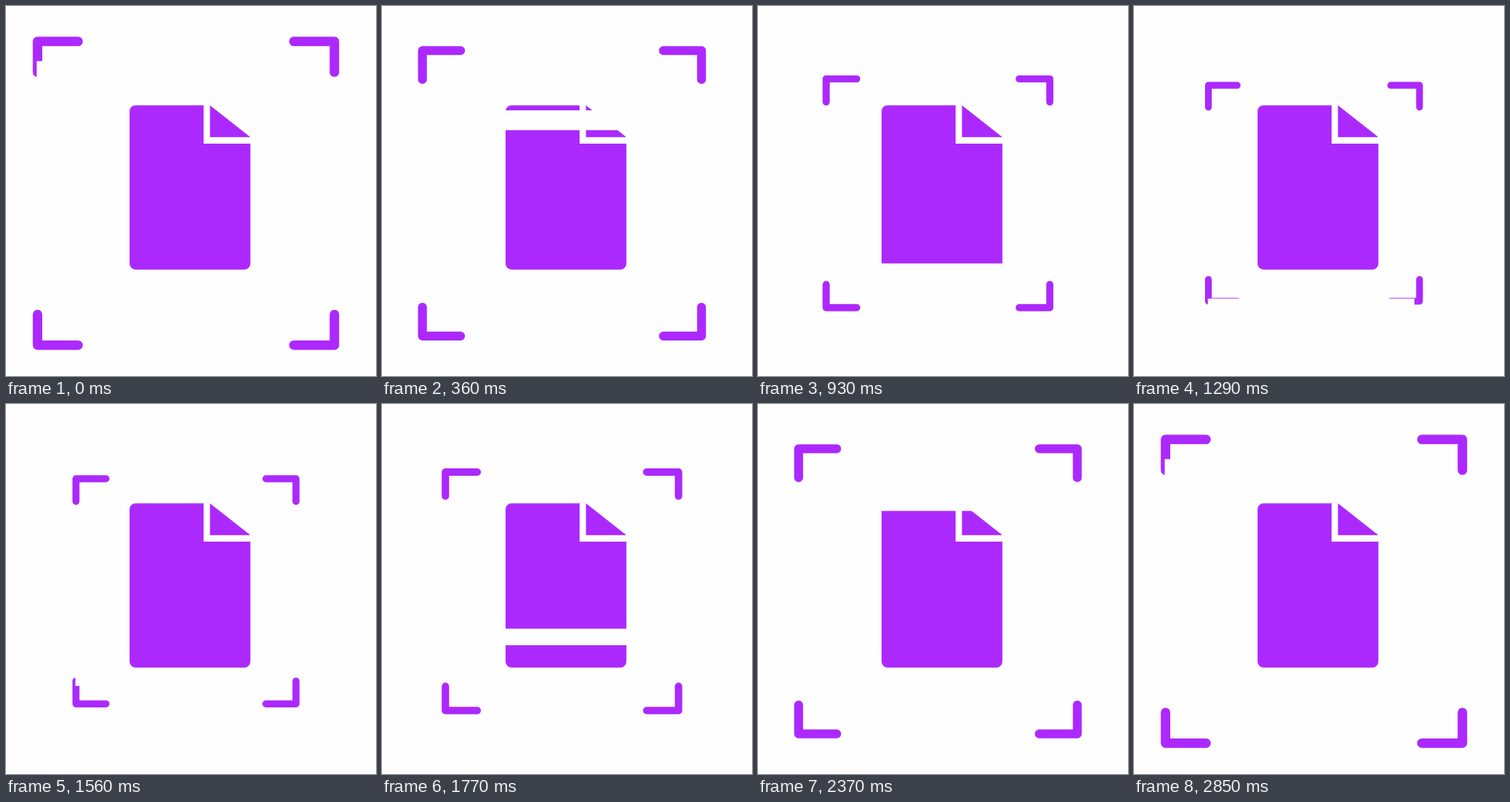
Write an HTML page with a canvas that moves like this. It is 500x500 px and loops after 2970 ms.

```html
<!DOCTYPE html>
<html lang="en">
<head>
<meta charset="utf-8">
<title>Document scan</title>
<style>
html, body { margin: 0; width: 100%; height: 100%; overflow: hidden; background: #fefefe; }
canvas { display: block; width: 500px; height: 500px; }
</style>
</head>
<body>
<canvas id="stage" width="500" height="500"></canvas>
<script>
const ctx = document.getElementById('stage').getContext('2d');
const LOOP = 2970, STEP = 30;
const PURPLE = '#ac29fd', PAPER = '#fefefe';
const CENTER = { x: 243.2, y: 253.1 };

const clamp = v => Math.min(1, Math.max(0, v));
const mix = (a, b, k) => a + (b - a) * k;

function ease(t, from, to) {
  const p = clamp((t - from) / (to - from));
  return p * p * (3 - 2 * p);
}

// Rises from 0 to 1, waits, then falls back to 0.
const swing = (t, top, leave, end) => ease(t, 0, top) - ease(t, leave, end);

function drawPage() {
  const l = 167, r = 330.3, t = 134.2, b = 356.2, rad = 8;
  ctx.fillStyle = PURPLE;
  ctx.beginPath();
  ctx.moveTo(l + rad, t);
  ctx.lineTo(267, t);
  ctx.lineTo(267, 186);
  ctx.lineTo(r, 186);
  ctx.arcTo(r, b, r - rad, b, rad);
  ctx.arcTo(l, b, l, b - rad, rad);
  ctx.arcTo(l, t, l + rad, t, rad);
  ctx.closePath();
  ctx.moveTo(275.6, t);
  ctx.lineTo(r, 177.3);
  ctx.lineTo(275.6, 177.3);
  ctx.closePath();
  ctx.fill();
}

function drawCorners(scale) {
  const width = 12.8, half = width / 2;
  const x = 207 - half, y = 211.6 - half;
  const armX = 67.6 - width, armY = 54.3 - width;
  ctx.save();
  ctx.translate(CENTER.x, CENTER.y);
  ctx.scale(scale, scale);
  ctx.strokeStyle = PURPLE;
  ctx.lineWidth = width;
  ctx.lineCap = ctx.lineJoin = 'round';
  for (const sx of [-1, 1]) {
    for (const sy of [-1, 1]) {
      ctx.beginPath();
      ctx.moveTo(sx * x, sy * (y - armY));
      ctx.lineTo(sx * x, sy * y);
      ctx.lineTo(sx * (x - armX), sy * y);
      ctx.stroke();
    }
  }
  ctx.restore();
}

function drawBar(k, scale) {
  const w = 392.6 * scale, h = 28.5 * scale;
  const x = mix(237.8, 239.4, k), y = mix(88.75, 406, k);
  ctx.fillStyle = PAPER;
  ctx.fillRect(x - w / 2, y - h / 2, w, h);
}

function draw(t) {
  const scale = 1 - 0.29 * swing(t, 1230, 1230, 2850);
  ctx.fillStyle = PAPER;
  ctx.fillRect(0, 0, 500, 500);
  drawPage();
  drawCorners(scale);
  drawBar(swing(t, 1230, 1260, 2700), scale);
}

const start = performance.now();
function tick() {
  const t = (performance.now() - start) % LOOP;
  draw(Math.floor(t / STEP) * STEP);
  requestAnimationFrame(tick);
}
tick();
</script>
</body>
</html>
```
